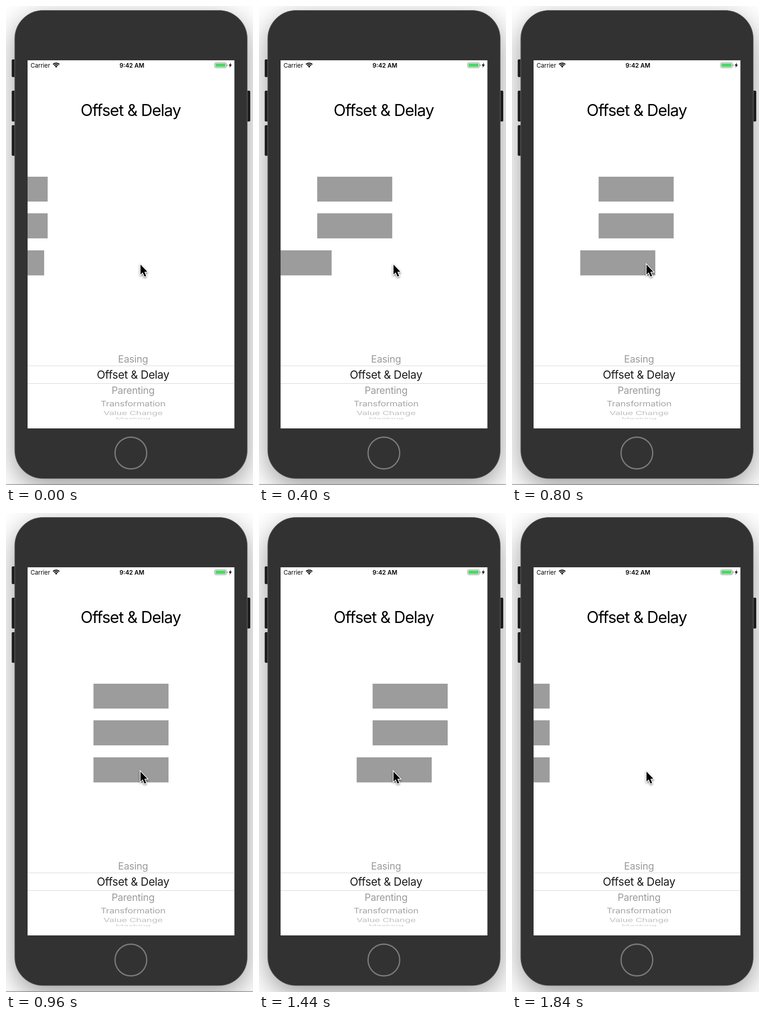
Write an HTML page with a canvas that moves like this. It is 538 px wide and 1041 px high and loops after 1920 ms.

```html
<!DOCTYPE html>
<html lang="en">
<head>
<meta charset="utf-8">
<title>Offset and delay</title>
<style>
  html, body { margin: 0; width: 100%; height: 100%; overflow: hidden; background: #fff; }
  canvas { display: block; width: 538px; height: 1041px; }
</style>
</head>
<body>
<canvas id="stage" width="538" height="1041"></canvas>
<script>
const ctx = document.getElementById('stage').getContext('2d');
const LOOP = 1920, STEP = 80;
const SCREEN = { x: 47, y: 118, w: 450.5, h: 800 };
const BAR = { w: 163.5, start: -81.5, travel: 272, reset: 1800 };

// Each move: begin time, duration, and the x of both bezier handles (y is 0 and 1).
const LEAD = { enter: [-75, 976, 0.264, 0.25], leave: [1255, 480, 0.4, 1] };
const LAG = { enter: [-51, 1000, 0.46, 0.86], leave: [1320, 480, 0.47, 1] };
const bars = [
  { y: 371, h: 54, move: LEAD },
  { y: 450.5, h: 54.5, move: LEAD },
  { y: 531, h: 54.5, move: LAG }
];

function progress(time, [begin, duration, x1, x2]) {
  const x = Math.min(1, Math.max(0, (time - begin) / duration));
  let low = 0, high = 1;
  for (let i = 0; i < 24; i++) {
    const s = (low + high) / 2, r = 1 - s;
    if (3 * x1 * s * r * r + 3 * x2 * s * s * r + s ** 3 < x) low = s;
    else high = s;
  }
  return low * low * (3 - 2 * low);
}

function barX(time, move) {
  if (time >= BAR.reset) time -= LOOP;
  return BAR.start + BAR.travel * (progress(time, move.enter) + progress(time, move.leave));
}

function rounded(x, y, w, h, r, fill) {
  ctx.beginPath();
  ctx.roundRect(x, y, w, h, r);
  if (fill) {
    ctx.fillStyle = fill;
    ctx.fill();
  }
}

function polygon(points, fill) {
  ctx.beginPath();
  points.forEach(([x, y]) => ctx.lineTo(x, y));
  ctx.closePath();
  ctx.fillStyle = fill;
  ctx.fill();
}

function text(string, x, y, size, { color = '#000', weight = 400, align = 'center', spacing = 0, squash = 1 } = {}) {
  ctx.save();
  ctx.translate(x, y);
  ctx.scale(1, squash);
  ctx.font = `${weight} ${size}px Inter, Roboto, sans-serif`;
  ctx.letterSpacing = `${spacing * size}px`;
  ctx.textAlign = align;
  ctx.fillStyle = color;
  ctx.fillText(string, 0, 0);
  ctx.restore();
}

function drawPhone() {
  ctx.fillStyle = '#fff';
  ctx.fillRect(0, 0, 538, 1041);

  ctx.save();
  ctx.shadowColor = 'rgba(0,0,0,0.4)';
  ctx.shadowBlur = 60;
  ctx.shadowOffsetY = 18;
  rounded(19, 9.5, 506.5, 1017.5, 62, '#323232');
  ctx.restore();

  for (const [x, y, h] of [[12.5, 116, 38.5], [12.5, 184, 67], [12.5, 259, 66.5], [522, 184, 67]]) {
    rounded(x, y, 10, h, 2.5, '#1c1c1c');
  }
  rounded(19, 9.5, 506.5, 1017.5, 62, '#323232');
  ctx.strokeStyle = '#6a6a6a';
  ctx.lineWidth = 1.2;
  ctx.stroke();

  ctx.beginPath();
  ctx.arc(272, 971.5, 34.5, 0, Math.PI * 2);
  ctx.strokeStyle = '#7a7a7a';
  ctx.lineWidth = 2.8;
  ctx.stroke();

  ctx.fillStyle = '#fff';
  ctx.fillRect(SCREEN.x, SCREEN.y, SCREEN.w, SCREEN.h);
}

function drawStatusBar() {
  text('Carrier', 53.5, 133.5, 13, { align: 'left' });
  text('9:42 AM', 274.2, 133.5, 13, { weight: 600 });

  const up = -Math.PI / 2, spread = 0.76;
  ctx.strokeStyle = '#000';
  ctx.lineWidth = 2.3;
  for (const r of [9.9, 6.3]) {
    ctx.beginPath();
    ctx.arc(109.3, 134, r, up - spread, up + spread);
    ctx.stroke();
  }
  ctx.beginPath();
  ctx.moveTo(109.3, 134);
  ctx.arc(109.3, 134, 3.9, up - spread, up + spread);
  ctx.fillStyle = '#000';
  ctx.fill();

  rounded(454.5, 123.3, 25.5, 11, 2.8);
  ctx.strokeStyle = '#858585';
  ctx.lineWidth = 1;
  ctx.stroke();
  rounded(456.2, 125, 22, 7.6, 1.3, '#4cd964');
  rounded(481, 127, 1.4, 3.8, 0.7, '#858585');
  polygon([[490, 123], [485, 129.6], [488, 129.6], [486.6, 134.5], [492, 127.6], [488.8, 127.6]], '#000');
}

function drawPicker() {
  const cx = 276.7, spacing = -0.015;
  text('Easing', cx, 774.5, 21.4, { color: '#9b9b9b', spacing });
  text('Offset & Delay', cx, 810, 24.2, { color: '#1c1c1c', spacing });
  text('Parenting', cx, 842.5, 21.4, { color: '#9b9b9b', spacing });
  text('Transformation', cx, 870, 20.3, { color: '#a4a4a4', spacing, squash: 0.79 });
  text('Value Change', cx, 889, 20.2, { color: '#bfbfbf', spacing, squash: 0.56 });
  text('Masking', cx, 897.5, 19.8, { color: '#d2d2d2', spacing, squash: 0.27 });
  ctx.fillStyle = '#d4d4d4';
  ctx.fillRect(SCREEN.x, 781.5, SCREEN.w, 1);
  ctx.fillRect(SCREEN.x, 820, SCREEN.w, 1);
}

function drawBars(time) {
  ctx.save();
  ctx.beginPath();
  ctx.rect(SCREEN.x, SCREEN.y, SCREEN.w, SCREEN.h);
  ctx.clip();
  ctx.fillStyle = '#9c9c9c';
  for (const { y, h, move } of bars) ctx.fillRect(barX(time, move), y, BAR.w, h);
  ctx.restore();
}

function drawCursor() {
  const arrow = [[293, 562], [293, 583.5], [297.8, 579], [301.7, 588], [305.2, 586.5], [301.4, 577.8], [307.8, 577.6]];
  ctx.save();
  ctx.shadowColor = 'rgba(0,0,0,0.4)';
  ctx.shadowBlur = 4;
  ctx.shadowOffsetY = 2;
  polygon(arrow, '#fff');
  ctx.strokeStyle = '#fff';
  ctx.lineWidth = 3;
  ctx.stroke();
  ctx.restore();
  polygon(arrow, '#000');
}

function draw(now) {
  const time = Math.floor((now % LOOP) / STEP) * STEP;
  drawPhone();
  drawStatusBar();
  text('Offset & Delay', 271.5, 238.5, 34.8, { spacing: -0.034 });
  drawBars(time);
  drawPicker();
  drawCursor();
  if (time < 1040) {
    ctx.fillStyle = '#666';
    ctx.fillRect(0, 1039.5, 538, 1);
  }
}

const origin = performance.now();
function tick() {
  draw(performance.now() - origin);
  requestAnimationFrame(tick);
}
tick();
</script>
</body>
</html>
```
